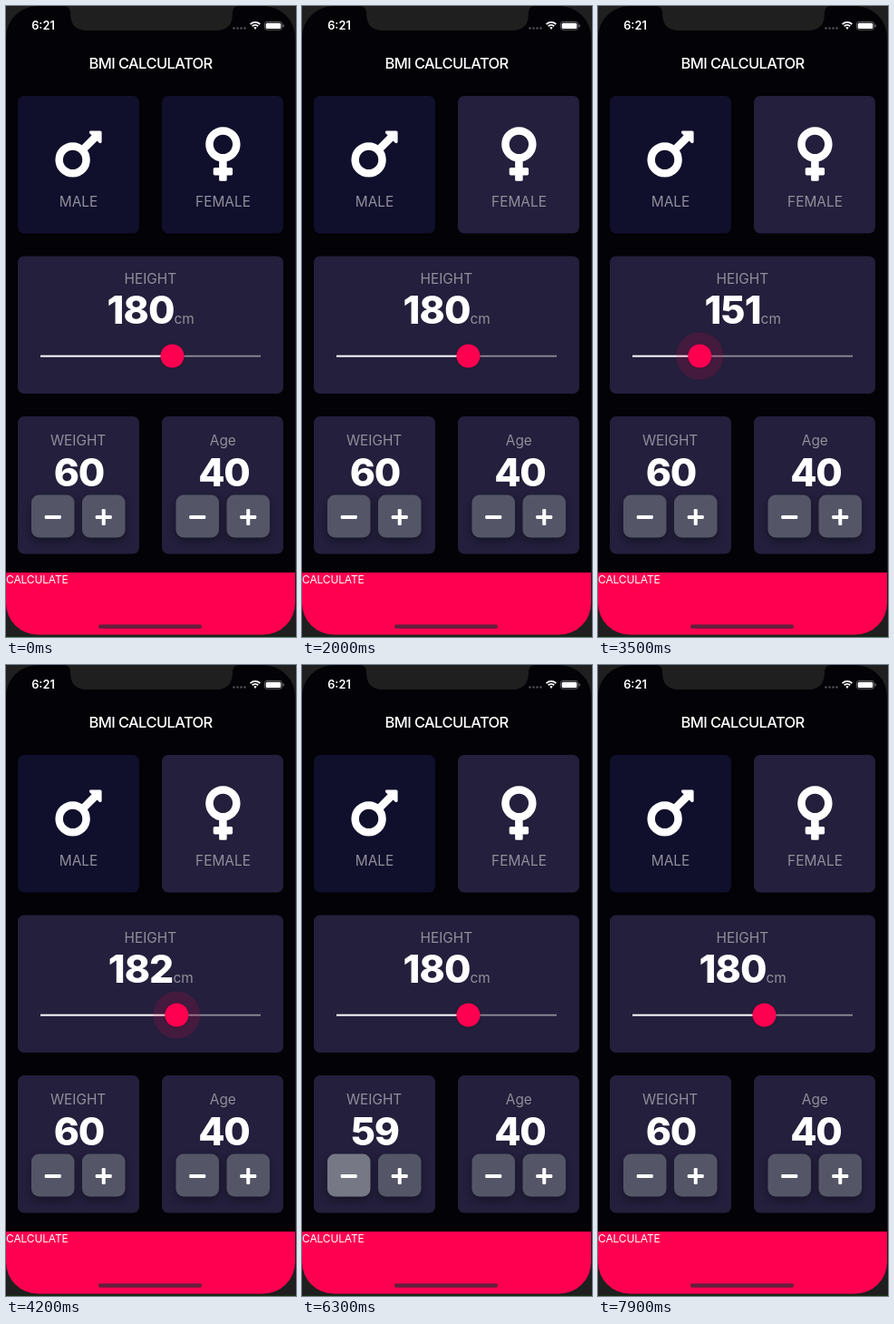
Recreate the animation shown at these times as an HTML page with a canvas. Size 320 px wide and 695 px high, loop 8000 ms.

```html
<!DOCTYPE html>
<html lang="en">
<head>
<meta charset="utf-8">
<title>BMI Calculator</title>
<style>
html, body { margin: 0; width: 100%; height: 100%; overflow: hidden; background: #020207; }
canvas { display: block; width: 320px; height: 695px; }
</style>
</head>
<body>
<canvas id="stage"></canvas>
<script>
const W = 320, H = 695, LOOP = 8000;
const canvas = document.getElementById('stage');
const ctx = canvas.getContext('2d');
const ratio = window.devicePixelRatio || 1;
canvas.width = W * ratio;
canvas.height = H * ratio;

const C = {
  bg: '#020207', off: '#100f2c', on: '#231f3c', grey: '#908f9c',
  pink: '#ff0050', bezel: '#1e1f1e', white: '#fff'
};

// Height in cm over time; the thumb eases between these points.
const drag = [[2300, 180], [3200, 142], [4200, 182], [4600, 180]];
const grab = 2250, drop = 4650;
const minusTap = 6150, plusTap = 7150;

const clamp = v => Math.max(0, Math.min(1, v));
const smooth = v => v * v * (3 - 2 * v);

function heightAt(t) {
  let v = drag[0][1];
  for (let i = 1; i < drag.length; i++) {
    const [t0, a] = drag[i - 1], [t1, b] = drag[i];
    if (t >= t0) v = a + (b - a) * smooth(clamp((t - t0) / (t1 - t0)));
  }
  return v;
}

function pulse(t, start, end) {
  return clamp((t - start) / 120) * clamp((end - t) / 200);
}

function box(x, y, w, h, r, fill) {
  ctx.fillStyle = fill;
  ctx.beginPath();
  ctx.roundRect(x, y, w, h, r);
  ctx.fill();
}

function disc(x, y, r, fill) {
  ctx.fillStyle = fill;
  ctx.beginPath();
  ctx.arc(x, y, r, 0, 7);
  ctx.fill();
}

function setFont(size, weight, spacing) {
  ctx.font = `${weight} ${size}px Inter, Roboto, sans-serif`;
  ctx.letterSpacing = spacing + 'px';
}

function text(str, x, y, size, weight, fill, spacing = 0, align = 'center') {
  setFont(size, weight, spacing);
  ctx.textAlign = align;
  ctx.fillStyle = fill;
  ctx.fillText(str, x, y);
}

const label = (str, x, y) => text(str, x, y, 15.4, 400, C.grey);
const number = (n, x, y) => text(n, x - 0.7, y, 42.7, 800, C.white, -1.4);

function icon(cx, cy, w, h, draw) {
  ctx.save();
  ctx.translate(cx, cy);
  ctx.scale(0.1333, 0.1333);
  ctx.translate(-w, -h);
  ctx.strokeStyle = ctx.fillStyle = C.white;
  draw();
  ctx.restore();
}

function ring(x, y) {
  ctx.lineWidth = 64;
  ctx.beginPath();
  ctx.arc(x, y, 112, 0, 7);
  ctx.stroke();
}

function male() {
  ring(144, 304);
  ctx.beginPath();
  ctx.moveTo(235, 213);
  ctx.lineTo(335, 113);
  ctx.stroke();
  ctx.lineWidth = 24;
  ctx.lineJoin = 'round';
  ctx.beginPath();
  ctx.moveTo(293, 76);
  ctx.lineTo(372, 76);
  ctx.lineTo(372, 155);
  ctx.closePath();
  ctx.fill();
  ctx.stroke();
}

function female() {
  ring(144, 176);
  box(112, 300, 64, 180, 12, C.white);
  box(64, 368, 160, 64, 12, C.white);
}

function button(x, y, plus, press) {
  ctx.save();
  ctx.shadowColor = 'rgba(0,0,0,.35)';
  ctx.shadowBlur = 8 * ratio;
  ctx.shadowOffsetY = 4 * ratio;
  box(x, y, 47.5, 47, 8.5, '#545668');
  ctx.restore();
  if (press > 0) box(x, y, 47.5, 47, 8.5, `rgba(255,255,255,${0.2 * press})`);
  const cx = x + 23.75, cy = y + 24.5;
  box(cx - 9, cy - 2, 18, 4, 1.3, C.white);
  if (plus) box(cx - 2, cy - 9, 4, 18, 1.3, C.white);
}

function slider(t) {
  const cm = heightAt(t), x = 37.7 + (cm - 120) * 2.43;
  const value = String(Math.round(cm));

  // Number and unit share a baseline and are centred as one row.
  setFont(42.7, 800, -0.9);
  const wide = ctx.measureText(value).width;
  setFont(15.4, 400, 0);
  const left = 159.7 - (wide + ctx.measureText('cm').width) / 2;
  text(value, left, 350, 42.7, 800, C.white, -0.9, 'left');
  text('cm', left + wide, 350, 15.4, 400, C.grey, 0, 'left');

  box(38, 384.8, 243, 1.7, 0, C.grey);
  box(38, 384.8, x - 38, 1.7, 0, C.white);
  const glow = pulse(t, grab, drop + 200);
  if (glow > 0) disc(x, 385.5, 26 * (0.4 + 0.6 * glow), `rgba(255,0,80,${0.15 * glow})`);
  ctx.save();
  ctx.shadowColor = 'rgba(0,0,0,.3)';
  ctx.shadowBlur = 2 * ratio;
  ctx.shadowOffsetY = 0.5 * ratio;
  disc(x, 385.5, 13, C.pink);
  ctx.restore();
}

function statusBar() {
  text('6:21', 41, 26, 12.8, 600, C.white);
  for (let i = 0; i < 4; i++) disc(251.5 + i * 4, 24.5, 1.2, '#555');
  ctx.strokeStyle = C.white;
  ctx.lineWidth = 1.8;
  for (const r of [4.6, 7.6]) {
    ctx.beginPath();
    ctx.arc(275, 25.5, r, -Math.PI * 0.75, -Math.PI * 0.25);
    ctx.stroke();
  }
  ctx.fillStyle = C.white;
  ctx.beginPath();
  ctx.moveTo(275, 26);
  ctx.arc(275, 25.5, 2.4, -Math.PI * 0.75, -Math.PI * 0.25);
  ctx.fill();
  ctx.strokeStyle = '#777';
  ctx.lineWidth = 0.8;
  ctx.beginPath();
  ctx.roundRect(285.4, 17.4, 19.2, 8.8, 2.6);
  ctx.stroke();
  box(286.7, 18.7, 16.6, 6.2, 1.5, C.white);
  box(305.6, 20.3, 1.2, 3, 0.6, '#777');
}

function bezel() {
  ctx.fillStyle = C.bezel;
  ctx.beginPath();
  ctx.rect(0, 0, W, H);
  ctx.roundRect(0, 0, W - 1, H - 2.5, 35);
  ctx.fill('evenodd');
  ctx.beginPath();
  ctx.moveTo(34, 0);
  ctx.lineTo(65, 0);
  ctx.quadraticCurveTo(71, 1, 71, 8);
  ctx.quadraticCurveTo(71, 27, 89, 27);
  ctx.lineTo(232, 27);
  ctx.quadraticCurveTo(250, 27, 250, 8);
  ctx.quadraticCurveTo(250, 1, 256, 0);
  ctx.fill();
  box(0, H - 1, W, 1, 0, '#12300f');
}

function draw(t) {
  ctx.setTransform(ratio, 0, 0, ratio, 0, 0);
  box(0, 0, W, H, 0, C.bg);
  statusBar();
  text('BMI CALCULATOR', 159.6, 69, 16.5, 500, C.white, -0.6);

  const chosen = t < 600 ? '' : t < 1500 ? 'male' : 'female';
  box(13, 99, 134, 151.5, 7, chosen === 'male' ? C.on : C.off);
  box(172, 99, 134, 151.5, 7, chosen === 'female' ? C.on : C.off);
  icon(80, 163, 192, 256, male);
  icon(239.4, 163, 144, 256, female);
  label('MALE', 80, 221);
  label('FEMALE', 239.5, 221);

  box(13, 275.5, 293, 151.5, 7, C.on);
  label('HEIGHT', 159.3, 306);
  slider(t);

  const weight = t >= minusTap && t < plusTap ? 59 : 60;
  box(13, 452, 134, 151.5, 7, C.on);
  box(172, 452, 134, 151.5, 7, C.on);
  label('WEIGHT', 79.6, 484);
  label('Age', 239.3, 484);
  number(weight, 81, 529);
  number(40, 241, 529);
  button(28, 538.5, false, pulse(t, minusTap - 80, minusTap + 420));
  button(84, 538.5, true, pulse(t, plusTap - 80, plusTap + 420));
  button(187.5, 538.5, false, 0);
  button(243.5, 538.5, true, 0);

  box(0, 624, W, H - 624, 0, C.pink);
  text('CALCULATE', 0, 635.5, 12, 400, C.white, -0.15, 'left');
  box(102, 681.3, 114, 4.4, 2.2, '#641e3b');
  bezel();
}

const start = performance.now();
function tick() {
  draw((performance.now() - start) % LOOP);
  requestAnimationFrame(tick);
}
tick();
</script>
</body>
</html>
```
